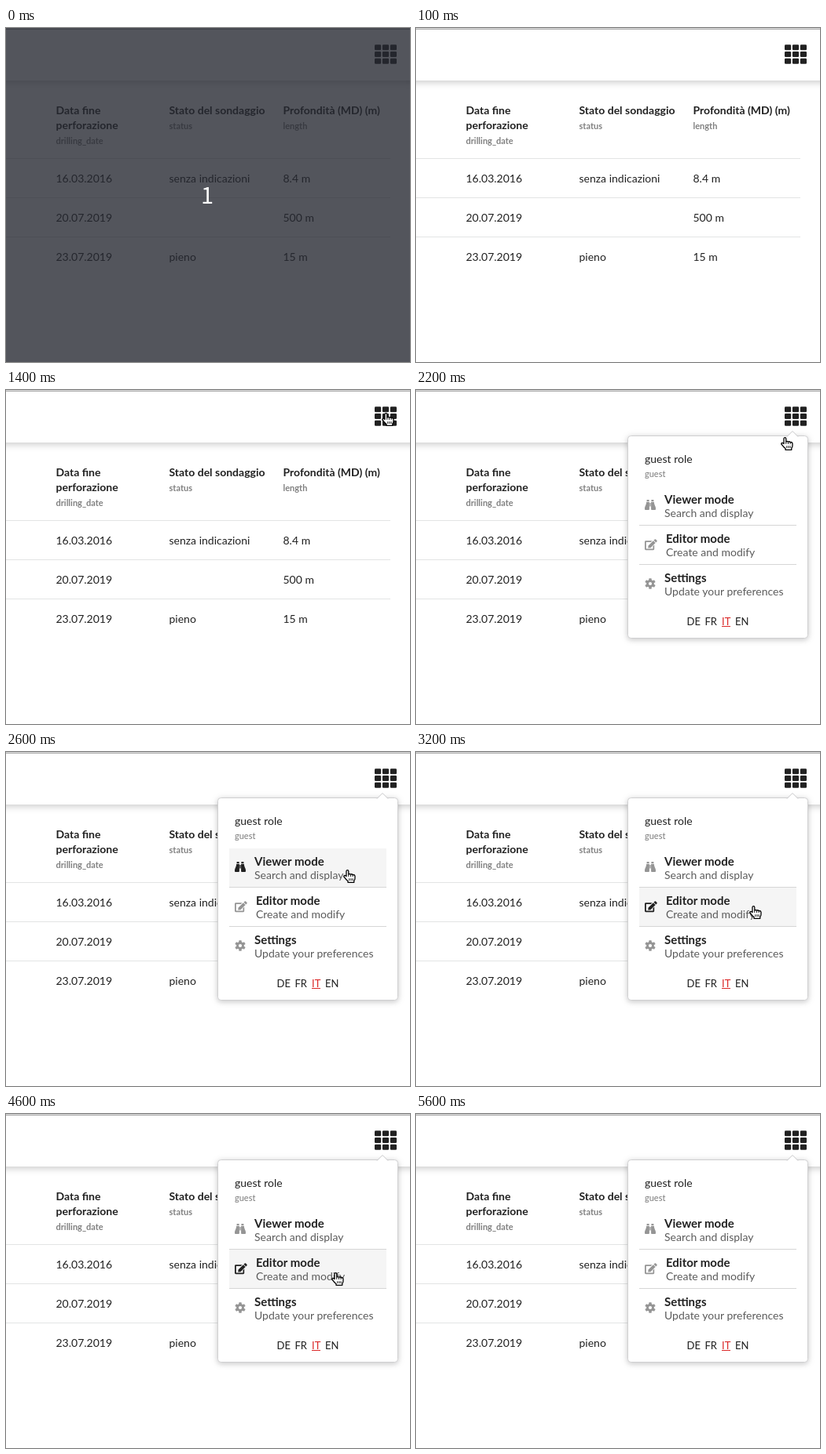
These frames come from a looping animation (514 px wide and 426 px high, 6.2 s). An HTML page:

```html
<!DOCTYPE html>
<html lang="it">
<head>
<meta charset="utf-8">
<title>Mode menu</title>
<style>
  html, body { margin: 0; width: 100%; height: 100%; overflow: hidden; background: #fff; }
  svg { display: block; width: 514px; height: 426px; }
  text { font: 14px Lato, sans-serif; fill: #212121; }
  .b { font-weight: 700; }
  .key { font-size: 11px; font-weight: 700; fill: #808080; }
  .role { font-size: 11px; fill: #7b7b7b; }
  .mode { font-size: 15px; font-weight: 700; }
  .desc { fill: #5c5c5c; }
  .lang { font-size: 13px; }
  .on { fill: #db2828; }
  .count { font: 29px "Noto Sans CJK JP", "Noto Sans CJK", sans-serif; fill: #fff; text-anchor: middle; }
  .rule { stroke: #e3e4e4; }
  .sep { stroke: #d6d6d6; }
  .bar { filter: drop-shadow(0 2px 5px rgba(0, 0, 0, .22)); }
  .card { filter: drop-shadow(0 2px 3px rgba(34, 36, 38, .14)) drop-shadow(0 1px 4px rgba(34, 36, 38, .12)); }
  .icon { fill: #959595; }
  .hot, #menu, #shade, #hand, #arrow { opacity: 0; }
  .hot .icon { fill: #212121; }
</style>
</head>
<body>
<svg viewBox="0 0 514 426">
  <defs>
    <g id="view">
      <path d="M2.6 0h3v2h-3zM8.4 0h3v2h-3zM2.2 2.7h3.7v9.4q0 .9-.9.9H.9Q0 13 0 12.1V10.700Q.1 9 1 7.500 2 5.500 2.200 2.700zM11.800 2.700H8.100v9.400q0 .9.9.9h4.100q.9 0 .9-.9V10.700Q13.900 9 13 7.500 12 5.500 11.800 2.700zM6.300 4h1.400v4.500H6.300z"/>
    </g>
    <g id="edit">
      <path d="M9.500 2.200 7.800 3.900H1.800v8.600h8.700V9.300l1.700-1.700v5.200q0 1.400-1.400 1.400H1.400Q0 14.200 0 12.800V3.600Q0 2.200 1.400 2.200z"/>
      <path d="M10.900 2.300 13.700 5.100 7.500 11.300 4.700 11.600Q4.200 11.600 4.300 11.100L4.600 8.500zM11.500 1.700 12.700.5q.7-.7 1.400 0l1.400 1.400q.7.700 0 1.400l-1.200 1.200z"/>
    </g>
    <g id="gear"></g>
  </defs>

  <rect width="514" height="426" fill="#fff"/>
  <rect class="bar" x="-20" y="-10" width="554" height="77" fill="#fff"/>
  <rect width="514" height="1" fill="#dcdcdc"/>
  <rect y="1" width="514" height="1" fill="#a9a9a9"/>
  <g id="grid" fill="#212121"></g>
  <g id="table"></g>

  <g id="menu">
    <rect class="card" x="269.500" y="58.500" width="229" height="258" rx="4" fill="#fff" stroke="#d0d0d1"/>
    <path d="M472 59.500 479 52.500 486 59.500" fill="#fff" stroke="#c6c6c8"/>
    <rect x="473" y="59" width="12" height="2" fill="#fff"/>
    <text x="291" y="93">guest role</text>
    <text x="291" y="111" class="role">guest</text>
    <g id="items"></g>
    <path class="sep" d="M284 172.500h200M284 222.500h200"/>
    <g id="langs"></g>
    <path d="M389 301.500h11" stroke="#db2828"/>
  </g>

  <g id="hand">
    <path d="M4 8.500V2.200Q4 .7 5.400.7T6.800 2.200V6Q8.200 4.800 9.400 6.200 11 5.200 12 6.700 14.300 6 15 8.200V11Q15 13 13.800 14V16.300H6V14.600Q4 13 2.600 11.100L.9 9Q.6 7.500 2 7.400 3.200 7.500 4 8.500z" fill="#fff" stroke="#000" stroke-width="1.300" stroke-linejoin="round"/>
    <path d="M6.800 6V9M9.500 6.500V9M12.100 7V9.200M7.800 11.200V14M10 11.200V14M12.100 11.200V14" stroke="#000" fill="none" stroke-width=".9"/>
  </g>
  <g id="arrow">
    <path d="M1.500 1.500V22L6.500 17.500 10 26 13.500 24.500 10 16.500H17z" fill="#fff" stroke="#000" stroke-width="1.300" stroke-linejoin="round"/>
  </g>

  <g id="shade">
    <rect width="514" height="426" fill="rgb(37,40,49)" fill-opacity=".79"/>
    <text x="256" y="224" class="count">1</text>
  </g>
</svg>
<script>
const LOOP = 6200;
const $ = id => document.getElementById(id);
const label = (x, y, s, c = "") => `<text x="${x}" y="${y}" class="${c}">${s}</text>`;

// Menu button: three by three tiles
for (let i = 0; i < 9; i++) {
  const x = 469 + (i % 3) * 9.92, y = 21.2 + Math.floor(i / 3) * 8.75;
  $("grid").innerHTML += `<rect x="${x}" y="${y}" width="8.170" height="7" rx="1.300"/>`;
}

// Gear: a ring with six teeth
$("gear").innerHTML = `<circle cx="7" cy="7" r="3.500" fill="none" style="stroke:currentColor" stroke-width="2.800"/>` +
  [0, 60, 120, 180, 240, 300].map(a =>
    `<rect x="5.300" y=".2" width="3.400" height="3" rx=".6" transform="rotate(${a} 7 7)"/>`).join("");

const columns = [
  [63.5, ["Data fine", "perforazione"], "drilling_date", ["16.03.2016", "20.07.2019", "23.07.2019"]],
  [207.5, ["Stato del sondaggio"], "status", ["senza indicazioni", "", "pieno"]],
  [352.5, ["Profondità (MD) (m)"], "length", ["8.4 m", "500 m", "15 m"]]
];
$("table").innerHTML = `<path class="rule" d="M0 166.500h489M0 216.500h489M0 266.500h489"/>` +
  columns.map(([x, head, key, cells]) =>
    head.map((s, i) => label(x, 110 + i * 19, s, "b")).join("") +
    label(x, 110 + head.length * 19, key, "key") +
    cells.map((s, i) => label(x, 197 + i * 50, s)).join("")).join("");

const items = [
  ["view", 316, "Viewer mode", "Search and display"],
  ["edit", 318, "Editor mode", "Create and modify"],
  ["gear", 316, "Settings", "Update your preferences"]
];
$("items").innerHTML = items.map(([icon, x, name, desc], i) => {
  const y = 140 + i * 50;
  const use = color => `<use href="#${icon}" class="icon" style="color:${color}" x="291" y="${y}"/>`;
  return use("#959595") +
    `<g class="hot" id="hot-${icon}"><rect x="284" y="${y - 17}" width="200" height="49" fill="#f5f5f5"/>${use("#212121")}</g>` +
    label(x, y + 5, name, "mode") + label(x, y + 22, desc, "desc");
}).join("");

$("langs").innerHTML = [[344.5, "DE"], [367.5, "FR"], [389, "IT"], [406, "EN"]]
  .map(([x, s]) => label(x, 300, s, s === "IT" ? "lang on" : "lang")).join("");

// Hold each value until the next time in the table
function hold(el, steps) {
  const frames = steps.map(([t, props]) => ({ offset: t / LOOP, easing: "step-end", ...props }));
  frames.push({ ...frames[frames.length - 1], offset: 1 });
  el.animate(frames, { duration: LOOP, iterations: Infinity });
}

// Visible between each pair of times
function show(el, ...times) {
  const steps = times.map((t, i) => [t, { opacity: i % 2 ? 0 : 1 }]);
  if (times[0] > 0) steps.unshift([0, { opacity: 0 }]);
  hold(el, steps);
}

const path = [
  [0, 65, 230], [800, 110, 215], [900, 185, 181], [1000, 280, 141], [1100, 385, 96],
  [1200, 469, 62], [1300, 460, 46], [1400, 478, 29],
  [2200, 464, 60], [2300, 458, 82], [2400, 448, 106], [2500, 437, 130], [2600, 429, 150], [2700, 424, 162],
  [3000, 424, 185], [3200, 424, 196], [3300, 425, 197], [3500, 424, 188],
  [3700, 423, 176], [3800, 422, 158], [3900, 421, 147], [4100, 421, 145],
  [4300, 422, 157], [4400, 420, 178], [4500, 417, 195], [4600, 414, 202],
  [5200, 320, 142], [5300, 227, 82], [5400, 133, 21]
];
const moves = path.map(([t, x, y]) => [t, { transform: `translate(${x}px, ${y}px)` }]);
hold($("hand"), moves);
hold($("arrow"), moves);

show($("hand"), 700, 5400);
show($("arrow"), 5400, 5600);
show($("shade"), 0, 100);
show($("menu"), 1700);
show($("hot-view"), 2500, 3200, 3800, 4400);
show($("hot-edit"), 3200, 3800, 4400, 5200);
</script>
</body>
</html>
```
